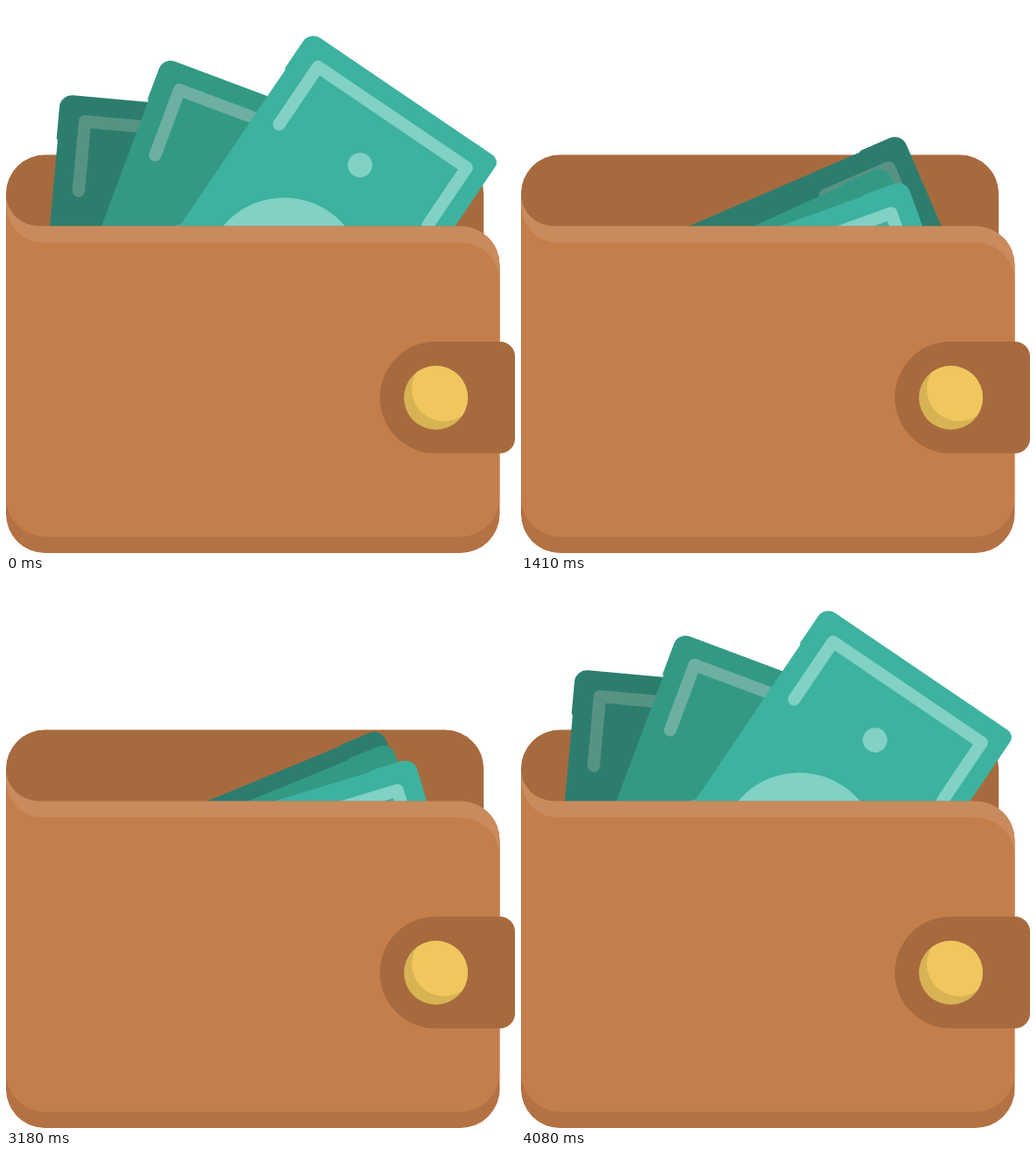
Animation of 550 by 590 pixels, one loop 4350 ms. Source, as an HTML page:

```html
<!DOCTYPE html>
<html lang="en">
<head>
<meta charset="utf-8">
<title>Wallet</title>
<style>
  html, body { margin: 0; width: 100%; height: 100%; overflow: hidden; background: #fff; }
  svg { display: block; width: 100%; height: 100%; }
</style>
</head>
<body>
<svg viewBox="0 0 550 590">
  <defs>
    <clipPath id="button"><circle cx="464.5" cy="422.5" r="34.5"/></clipPath>
    <clipPath id="front">
      <path d="M0 203A36 34.5 0 0 0 36 237.5H491A42.5 42 0 0 1 533.5 279.5V548A42.5 42 0 0 1 491 590H42A42 42 0 0 1 0 548Z"/>
    </clipPath>
  </defs>

  <path fill="#a76a3e" d="M0 203A42 42 0 0 1 42 160.5H474A42 42 0 0 1 516.2 203V270H36L0 240Z"/>
  <g id="bills"></g>

  <g clip-path="url(#front)">
    <rect y="190" width="534" height="400" fill="#b37144"/>
    <path fill="#c98b5d" d="M0 190H534V400H0Z"/>
    <path fill="#c47e4b" d="M0 212A38 43 0 0 0 38 255H491A42.5 42 0 0 1 533.5 297V530A42.5 42.5 0 0 1 491 572.5H42A42 42.5 0 0 1 0 530Z"/>
  </g>

  <path fill="#a76a3e" d="M464 362H534A16 16 0 0 1 550 378V466.5A16 16 0 0 1 534 482.5H464A60 60.2 0 0 1 464 362Z"/>
  <g clip-path="url(#button)">
    <rect x="425" y="383" width="80" height="80" fill="#d7b354"/>
    <circle cx="473.5" cy="413" r="35" fill="#f0c75e"/>
  </g>
</svg>

<script>
const LOOP = 4350, STEP = 30;
const LEAVE = { from: 600, to: 1740 };
const ENTER = { from: 2790, to: 4080 };

// Poses hold the x, y and angle of a bill's top left corner.
// All bills tuck away into the same hidden pose.
const HIDDEN = [464, 235, 79];

// leave and enter are the poses halfway; bend rounds the path between them.
const bills = [
  { paper: '#2d7d6f', ink: '#579384', bend: 2.2,
    rest: [58.5, 93, 5.2], leave: [302, 54.5, 45], enter: [301, 95, 48] },
  { paper: '#339985', ink: '#6dafa3', bend: 1.2,
    rest: [170, 53, 20.5], leave: [289.5, 76.5, 45], enter: [346, 92, 52] },
  { paper: '#3db29e', ink: '#81d1c5', bend: 1.2,
    rest: [329, 25, 34.1], leave: [350, 110.5, 56.3], enter: [410, 126, 64] }
];

const layer = document.getElementById('bills');
for (const bill of bills) {
  layer.insertAdjacentHTML('beforeend', `<g>
    <path fill="${bill.paper}" d="M14 2H239.5A9 9 0 0 1 248.5 11V455H2V52L.7 50V15.5A13.5 13.5 0 0 1 14 2Z"/>
    <path fill="none" stroke="${bill.ink}" stroke-width="13.5" stroke-linecap="round" stroke-linejoin="round"
      d="M29.5 104V29H223.5V104"/>
    <g fill="${bill.ink}">
      <circle cx="126.5" cy="91.4" r="13.3"/>
      <circle cx="126.5" cy="237.6" r="86"/>
    </g>
  </g>`);
  bill.node = layer.lastElementChild;
}

function ease(t, { from, to }) {
  const s = Math.min(Math.max((t - from) / (to - from), 0), 1);
  return (1 - Math.cos(Math.PI * s)) / 2;
}

// A straight way from rest to hidden, arched through the halfway pose.
function poseAt(rest, half, bend, p) {
  const arch = 1 - Math.abs(1 - 2 * p) ** bend;
  return rest.map((a, i) => {
    const b = HIDDEN[i];
    return a + (b - a) * p + (half[i] - (a + b) / 2) * arch;
  });
}

function draw(ms) {
  const t = Math.floor((ms % LOOP) / STEP) * STEP;
  const leaving = t < ENTER.from;
  const p = leaving ? ease(t, LEAVE) : 1 - ease(t, ENTER);
  for (const { node, rest, leave, enter, bend } of bills) {
    const [x, y, angle] = poseAt(rest, leaving ? leave : enter, bend, p);
    node.setAttribute('transform', `translate(${x} ${y}) rotate(${angle})`);
  }
}

const start = performance.now();
function tick() {
  draw(performance.now() - start);
  requestAnimationFrame(tick);
}
tick();
</script>
</body>
</html>
```
